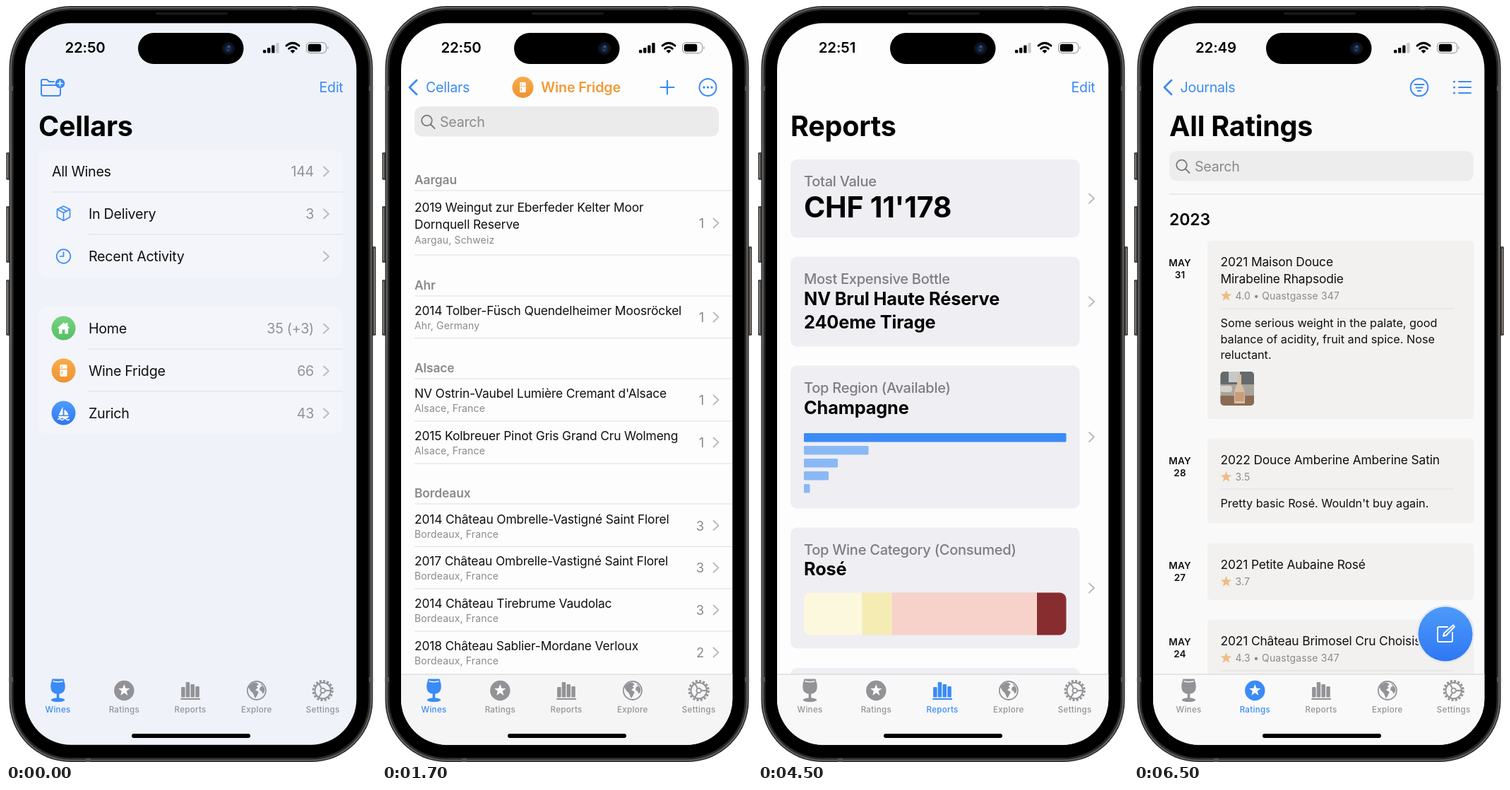
Animation of 524x1069 px, one loop 8000 ms. Source, as an HTML page:

```html
<!DOCTYPE html>
<html lang="en">
<head>
<meta charset="utf-8">
<title>Wine cellar app</title>
<style>
html, body { margin: 0; width: 100%; height: 100%; overflow: hidden; background: #fff; }
svg { display: block; width: 524px; height: 1069px; font-family: Inter, Roboto, sans-serif; }
</style>
</head>
<body>
<svg id="stage" viewBox="0 0 524 1069"></svg>
<script>
const BLUE = '#3b8bf6', ORANGE = '#f19a38', GRAY = '#8a8a8e', INK = '#101012';

// Drawing helpers; each returns SVG markup.
// Larger text is set tighter, bold text a little less so.
const tracking = (s, weight) => Math.max(weight >= 600 ? -.006 : -.015, .025 - .0058 * (s - 11.6)) * s;
const text = (x, y, str, size, fill = INK, weight = 400, anchor = 'start') =>
  `<text x="${x}" y="${y}" font-size="${size}" fill="${fill}" font-weight="${weight}" text-anchor="${anchor}" letter-spacing="${tracking(size, weight).toFixed(3)}">${str}</text>`;
const rect = (x, y, w, h, r, fill, extra = '') =>
  `<rect x="${x}" y="${y}" width="${w}" height="${h}" rx="${r}" fill="${fill}" ${extra}/>`;
const disc = (x, y, r, fill) => `<circle cx="${x}" cy="${y}" r="${r}" fill="${fill}"/>`;
const ring = (x, y, r, color, w = 2, extra = '') =>
  `<circle cx="${x}" cy="${y}" r="${r}" fill="none" stroke="${color}" stroke-width="${w}" ${extra}/>`;
const fillPath = (d, fill) => `<path d="${d}" fill="${fill}"/>`;
const stroke = (d, color, w = 2) =>
  `<path d="${d}" fill="none" stroke="${color}" stroke-width="${w}" stroke-linecap="round" stroke-linejoin="round"/>`;
const rule = (y, x = 46, end = 496, color = '#dedee0') => rect(x, y - .5, end - x, 1, 0, color);
const at = (x, y, body) => `<g transform="translate(${x} ${y})">${body}</g>`;
const many = (list, draw) => list.map(draw).join('');

const chevron = (x, y) => stroke(`M${x - 3.5} ${y - 6.5}l7 6.5l-7 6.5`, '#bbbbc0');
const back = x => stroke(`M${x + 11} 105l-10 10l10 10`, BLUE, 2.8);
const plus = (x, y, r, color, w = 2) => stroke(`M${x - r} ${y}h${2 * r}M${x} ${y - r}v${2 * r}`, color, w);
const starPath = (x, y, r) => 'M' + Array.from({ length: 10 }, (_, i) => {
  const a = i * Math.PI / 5, k = i % 2 ? r * .42 : r;
  return `${(x + k * Math.sin(a)).toFixed(2)} ${(y - k * Math.cos(a)).toFixed(2)}`;
}).join('L') + 'Z';
const heading = str => text(46, 184, str, 39.5, '#000', 700);
const edit = text(477.5, 122, 'Edit', 19.7, BLUE, 400, 'end');
const searchBox = (x, y, fill) => rect(x, y, 431, 42.5, 11, fill) +
  ring(x + 17.5, y + 20, 7.3, '#77777b', 1.8) + stroke(`M${x + 23} ${y + 25.5}l5.5 5.5`, '#77777b', 1.8) +
  text(x + 36, y + 29, 'Search', 19.7, GRAY);

const house = fillPath('M-9 0L0-8L3-5.5V-7.5H6V-3L9 0H6.5V8H2V2H-2V8H-6.5V0Z', '#fff');
const fridge = rect(-5, -8.5, 10, 17, 1.5, '#fff') + fillPath('M-5-2H5M-3-6h1.3v2.5H-3zM-3 1h1.3v4H-3zM-5-2.5H5v1H-5z', ORANGE);
const boat = fillPath('M-1-9V3H-7ZM1-5Q6-2 7 3H1ZM-8 4.5H8L5.5 7.5H-5.5Z', '#fff') + stroke('M-8 9q2-2 4 0t4 0t4 0t4 0', '#fff', 1.2);

// Status bar
function status(time, dx, weak) {
  const bars = many([4.5, 7.5, 11, 14.5], (h, i) =>
    rect(364 + i * 6.1, 66.5 - h, 4.3, h, 1.2, i == 3 && weak ? '#c9c9cb' : '#000'));
  const wifi = many([[9, 56.2], [5.4, 60.3]], ([r, y]) => stroke(`M${406 - r} ${y}Q406 ${y - r * .85} ${406 + r} ${y}`, '#000', 2.9)) +
    fillPath('M406 67l-3.4-3.6q3.4-2.8 6.8 0z', '#000');
  const battery = rect(425.6, 51.6, 28, 15, 5, 'none', 'stroke="#a2a2a6" stroke-width="1.2"') +
    rect(427.8, 53.8, 18.5, 10.6, 3, '#000') + fillPath('M455.4 56.5q2.6 2.6 0 5.2z', '#a2a2a6');
  return at(dx, 0, text(112, 66, time, 20.4, '#000', 600, 'middle') + bars + wifi + battery);
}

// Tab bar; icons are centred on the origin and coloured by c.
const tabs = [
  ['Wines', c => fillPath('M-8-16.5H8Q10.3-10 10.3-5.5Q10.3 4.6 0 5Q-10.3 4.6-10.3-5.5Q-10.3-10-8-16.5Z', c) + rect(-1.8, 4, 3.6, 9, 0, c) +
    `<ellipse cy="13.2" rx="9.8" ry="2.9" fill="${c}"/>` + stroke('M-6.5-13Q0-11.4 6.5-13', '#f4f5f8', 1.4)],
  ['Ratings', c => disc(0, 0, 14.2, c) + fillPath(starPath(0, -.3, 8.6), '#fff')],
  ['Reports', c => many([[-13, -5], [-6.4, -12], [.4, -9], [7.2, -6]], ([x, y]) => rect(x, y, 5.5, 9.5 - y, 1.3, c)) +
    rect(-14, 10.8, 28, 2.1, 1, c)],
  ['Explore', c => ring(0, 0, 13, c, 1.8) +
    fillPath('M-11.5-5Q-8-11-1-11.5L3-9L0-6L2-4L-2-1L3 2L0 8L-2 11L-5 4L-9 0ZM5-10Q11-7 11.5 0L9 5L7 1L4-1L5-5L8-6Z', c)],
  ['Settings', c => ring(0, 0, 11.3, c) + ring(0, 0, 13.7, c, 2.8, 'stroke-dasharray="3.1 2.28"') +
    ring(0, 0, 3.3, c, 1.8) + stroke('M3.5 0H10.5M-1.7-3L-5.2-9.2M-1.7 3L-5.2 9.2', c)]
];
function tabBar(active, dx, fill) {
  const bar = fill ? rect(26, 945, 472, 102, 0, fill) + rule(945, 26, 498, '#d2d2d4') : '';
  return bar + many(tabs, ([name, icon], i) => {
    const c = i == active ? BLUE : '#939397', x = 73.5 + i * 93.8 + dx;
    return at(x, 968, icon(c)) + text(x, 999, name, 11.6, c, 500, 'middle');
  }) + rect(178 + dx, 1029, 168, 6, 3, '#000');
}

function cellars() {
  const row = (y, name, x, count = '') => text(x, y + 7, name, 19.7) +
    text(436, y + 7, count, 19.7, '#929296', 400, 'end') + chevron(453.5, y);
  const places = [[456, 'Home', '35 (+3)', 'green', house], [516, 'Wine Fridge', '66', 'orange', fridge], [576, 'Zurich', '43', 'blue', boat]];
  return stroke('M50 124V106Q50 104 52 104H58L61 107H68M50 112H77M77 117V124Q77 127 74 127H53Q50 127 50 124', BLUE) +
    disc(76.5, 109.5, 6.8, BLUE) + plus(76.5, 109.5, 3.4, '#fff', 1.6) + edit + heading('Cellars') +
    rect(46, 204, 431, 180, 12, '#f3f5fa') + rect(46, 425, 431, 180, 12, '#f3f5fa') +
    row(234, 'All Wines', 65, '144') + row(294, 'In Delivery', 117, '3') + row(354, 'Recent Activity', 117) +
    many([[263, 65], [323, 117], [485, 117], [545, 117]], ([y, x]) => rule(y, x, 477)) +
    stroke('M81.5 283l9 4.5v11l-9 5l-9-5v-11zM72.5 287.5l9 5l9-5M81.5 292.5v11M77 285.3l9 5', BLUE, 1.6) +
    ring(81.5, 354, 9.8, BLUE, 1.7) + stroke('M81.5 348v6h-5', BLUE, 1.7) +
    many(places, ([y, name, count, color, icon]) => disc(81.5, y - .5, 17, `url(#${color})`) + at(81.5, y - .5, icon) + row(y, name, 117, count));
}

function wineList() {
  const wine = (y, name, place, count) => text(46, y, name, 17.4) + text(46, y + 20, place, 14, GRAY) +
    text(456, y + 10, count, 18.5, GRAY, 400, 'end') + chevron(473, y + 3);
  return back(38) + text(62, 122, 'Cellars', 19.7, BLUE) + disc(199.5, 115, 15, 'url(#orange)') + at(199.5, 115, `<g transform="scale(.85)">${fridge}</g>`) +
    text(225, 122, 'Wine Fridge', 19.7, ORANGE, 600) + plus(404, 115, 9.5, BLUE, 2.2) + ring(461.5, 115, 12, BLUE) +
    many([-5.5, 0, 5.5], d => disc(461.5 + d, 115, 1.7, BLUE)) + searchBox(46, 142, '#ebebec') +
    many([['Aargau', 252], ['Ahr', 401], ['Alsace', 518], ['Bordeaux', 695]], ([s, y]) => text(46, y, s, 17.4, GRAY, 600) + rule(y + 9)) +
    text(46, 291, '2019 Weingut zur Eberfeder Kelter Moor', 17.4) + text(46, 315, 'Dornquell Reserve', 17.4) +
    text(46, 336, 'Aargau, Schweiz', 14, GRAY) + text(456, 314, '1', 18.5, GRAY, 400, 'end') + chevron(473, 307) +
    wine(437, '2014 Tolber-Füsch Quendelheimer Moosröckel', 'Ahr, Germany', 1) +
    wine(554, "NV Ostrin-Vaubel Lumière Cremant d'Alsace", 'Alsace, France', 1) +
    wine(614, '2015 Kolbreuer Pinot Gris Grand Cru Wolmeng', 'Alsace, France', 1) +
    many([['2014 Château Ombrelle-Vastigné Saint Florel', 3], ['2017 Château Ombrelle-Vastigné Saint Florel', 3],
      ['2014 Château Tirebrume Vaudolac', 3], ['2018 Château Sablier-Mordane Verloux', 2]],
      ([name, n], i) => wine(731.5 + i * 59.8, name, 'Bordeaux, France', n)) +
    many([352, 469.5, 587, 647, 764.5, 824, 884], y => rule(y));
}

function detail() {
  const button = (x, label, iconX, labelX, glyph) => rect(x, 328, 171.5, 52, 9, '#edf1ea') + disc(iconX, 354, 10.2, BLUE) +
    stroke(glyph, '#fff', 2.2) + text(labelX, 360.5, label, 18.6, BLUE, 600);
  const chip = (x, y, w, name) => rect(x, y, w, 31.5, 15.7, '#ebf6ed') + text(x + 11.5, y + 21, name, 14) +
    ring(x + w - 20, y + 16, 6.8, BLUE, 1.3) + disc(x + w - 20, y + 12.8, 1, BLUE) + stroke(`M${x + w - 20.8} ${y + 15.5}h1v4`, BLUE, 1.2);
  const action = (y, name) => text(98, y, name, 19.4, BLUE);
  return back(38) + text(262, 184, '2017', 19.7, INK, 600, 'middle') +
    text(262, 219, 'Château Ombrelle-Vastigné', 25, '#000', 700, 'middle') + text(262, 252, 'Saint Florel', 25, '#000', 700, 'middle') +
    text(262, 278, 'Red Wine from Bordeaux, France', 14, GRAY, 400, 'middle') + text(262, 299.5, 'Wine Fridge', 14, ORANGE, 600, 'middle') +
    button(83, 'Add', 145.5, 167, 'M140.5 354h10M145.5 349v10') + button(269.5, 'Remove', 314, 336, 'M309 354h10') +
    many([['Inventory', 428], ['Past Transactions', 538], ['Grape Varieties', 649], ['More Actions', 805]],
      ([s, y]) => text(46, y, s, 17.4, '#858589', 500) + rule(y + 9.3)) +
    text(46, 471, '750 ml', 19.7) + text(478, 471, '3', 19.7, GRAY, 400, 'end') + rule(490) +
    rect(46, 559.5, 28.5, 28.5, 6, '#e8f6e9') + plus(60.2, 574, 6, '#5dbb63', 2.3) +
    text(86.5, 570, '3 ×', 15, GRAY) + text(114, 570, '750 ml', 15) +
    text(86.5, 590, 'Added • 1 month ago • CHF 77.00 per btl. • Cavuro', 14, GRAY) + rule(600) +
    chip(46, 671, 154, 'Cabernet Franc') + chip(210.5, 671, 187, 'Cabernet Sauvignon') +
    chip(46, 712.5, 93, 'Merlot') + chip(150, 712.5, 129.5, 'Petit Verdot') +
    stroke(starPath(62, 842, 11), BLUE, 1.7) + action(848, 'Add Rating') + rule(867) +
    stroke('M53 893V891Q53 889 55 889H70Q72 889 72 891V901Q72 904 69 904H60M54 885.5H71M56 882.5H69', BLUE, 1.7) +
    disc(53.5, 900, 5.2, BLUE) + plus(53.5, 900, 2.6, '#fff', 1.3) + action(900, 'Add Another Vintage') + rule(920) +
    stroke('M54 953L60 938L66 953M67 937H75M71 937V950', BLUE, 1.8) + action(952.5, 'Edit Wine');
}

function reports() {
  const card = (y, h, label) => rect(46, y, 409.5, h, 9, '#efeef3') + text(65, y + 38, label, 20.1, '#7d7d82', 500) + chevron(472.5, y + h / 2);
  const big = (y, str) => text(65, y, str, 25.3, '#000', 700);
  const strip = [[65, 82, '#fcf8dd'], [147.5, 41.5, '#f5ecb4'], [189.5, 205, '#f6d2ca'], [395, 42, '#882d2f']];
  return edit + heading('Reports') +
    card(217, 110.5, 'Total Value') + text(65, 299, "CHF 11'178", 41, '#000', 700) +
    card(354.5, 127, 'Most Expensive Bottle') + big(422.5, 'NV Brul Haute Réserve') + big(456, '240eme Tirage') +
    card(508.5, 202, 'Top Region (Available)') + big(577, 'Champagne') +
    many([371.5, 91.5, 48, 35, 8.5], (w, i) => rect(65, 604 + i * 18, w, 12.5, 1.5, i ? '#89b9f5' : BLUE)) +
    card(737.5, 171, 'Top Wine Category (Consumed)') + big(805, 'Rosé') +
    `<g clip-path="url(#strip)">${many(strip, ([x, w, c]) => rect(x, 829, w, 61, 0, c))}</g>` +
    rect(46, 936, 409.5, 60, 9, '#efeef3');
}

function ratings() {
  const entry = (y, h, day, lines, score) => {
    const end = y + 36 + (lines.length - 1) * 23.5;
    return rect(104, y, 377, h, 5, '#f2f1f0') + text(65, y + 36, 'MAY', 13.5, INK, 600, 'middle') + text(65, y + 53, day, 13.5, INK, 600, 'middle') +
      many(lines, (s, i) => text(122.5, y + 36 + i * 23.5, s, 17.4)) +
      fillPath(starPath(130.5, end + 18.5, 8.2), '#ecbd85') + text(143.5, end + 23.5, score, 14, GRAY);
  };
  const note = (y, str) => text(122.5, y, str, 16.3);
  const photo = `<g clip-path="url(#photo)">${rect(122, 517, 49, 49, 0, '#a9a39b') + rect(122, 517, 49, 18, 0, '#666a6c') +
    rect(134, 517, 16, 15, 0, '#c5c9c9') + rect(122, 551, 49, 15, 0, '#8b6a53') + rect(122, 537, 17, 9, 4, '#d5d0c8') +
    fillPath('M146 521H152V535Q158 541 157 562H142Q141 541 146 535Z', '#d8bfa5') + rect(143, 546, 13, 13, 1, '#c89e78')}</g>`;
  return back(42) + text(65.5, 122, 'Journals', 19.7, BLUE) + ring(404, 115, 12.3, BLUE) +
    stroke('M397.5 111h13M399.5 115.5h9M402 120h4', BLUE) +
    many([107, 115, 123], y => disc(453.5, y, 1.6, BLUE) + stroke(`M460 ${y}h17`, BLUE)) +
    at(4, 0, heading('All Ratings')) + searchBox(50, 205, '#ededed') + rule(266, 50) + text(50, 310, '2023', 23, '#000', 600) +
    entry(332, 252, 31, ['2021 Maison Douce', 'Mirabeline Rhapsodie'], '4.0 • Quastgasse 347') + rule(428, 123, 452) +
    note(454, 'Some serious weight in the palate, good') + note(476.5, 'balance of acidity, fruit and spice. Nose') + note(499, 'reluctant.') + photo +
    entry(611.5, 120, 28, ['2022 Douce Amberine Amberine Satin'], '3.5') + rule(683, 123, 452) +
    note(709, "Pretty basic Rosé. Wouldn't buy again.") +
    entry(759.5, 80.5, 27, ['2021 Petite Aubaine Rosé'], '3.7') +
    entry(867.5, 120, 24, ['2021 Château Brimosel Cru Choisis'], '4.3 • Quastgasse 347') + rule(940, 123, 452) +
    disc(441, 888, 41, '#e4e9f1') + disc(441, 888, 38.5, 'url(#blue)') +
    stroke('M444 878H432Q430 878 430 880V897Q430 899 432 899H449Q451 899 451 897V886M438 891L439 887L452 875.5L454 877.5L442 890Z', '#fff', 1.9);
}

// [start ms, background, body, time, active tab, x shift, tab bar fill, weak signal]
const screens = [
  [0, '#eff2f9', cellars, '22:50', 0, 0, '', true],
  [500, '#fdfdfd', wineList, '22:50', 0, 0, '#f5f5f6', false],
  [2500, '#fcfcfc', detail, '22:50', 0, 0, '#f8f9f8', true],
  [4500, '#fdfdfd', reports, '22:51', 2, 0, '#f8f8f9', true],
  [6500, '#f9f9f9', ratings, '22:49', 1, 4, '#f9f9f9', true]
];
const gradient = (id, from, to) =>
  `<linearGradient id="${id}" x2="0" y2="1"><stop stop-color="${from}"/><stop offset="1" stop-color="${to}"/></linearGradient>`;
const clip = (id, ...box) => `<clipPath id="${id}">${rect(...box, '#000')}</clipPath>`;

// Phone body: metal rings nested around the black bezel
const body = (inset, fill) => rect(4.5 + inset, inset, 515 - 2 * inset, 1069 - 2 * inset, 87 - inset, fill);
const phone = many([[207, 39], [283, 80], [387, 79]], ([y, h]) => rect(0, y, 7, h, 2, '#4a4947') + rect(1, y + 3, 1.5, h - 6, 0, '#85827e')) +
  rect(517, 340, 7, 126, 2, '#4a4947') + rect(521.5, 343, 1.5, 120, 0, '#85827e') +
  body(0, '#2b2a29') + body(1.5, '#6b6966') + body(3.2, '#2c2b2a') + body(6, '#000') +
  many([[4.5, 113], [4.5, 949], [514, 113], [514, 949]], ([x, y]) => rect(x, y, 5.5, 7, 0, '#555350')) +
  rect(405, 0, 7, 5, 0, '#555350') + rect(113, 1064, 7, 5, 0, '#555350') + rect(212, 9, 102, 3.5, 1.7, '#181818');

const island = rect(187, 38, 149.5, 44, 22, '#000') + disc(315, 60, 9, '#0e131d') + disc(315, 60, 5, '#17284a') + disc(315.5, 57.5, 2, '#31558d') + disc(314.5, 62.5, 1.5, '#284a80');

const stage = document.getElementById('stage');
stage.innerHTML = `<defs>${gradient('green', '#77d282', '#56bf63') + gradient('orange', '#f8ac4b', '#ef922f') + gradient('blue', '#4d9bfa', '#2f77f3') +
  clip('screen', 27, 24.3, 469.3, 1020.4, 65) + clip('strip', 65, 829.5, 371.5, 60, 9) + clip('photo', 122.5, 517, 47.5, 48, 5)}</defs>` + phone +
  `<g clip-path="url(#screen)">${many(screens, ([, bg, content, time, tab, dx, bar, weak]) =>
    `<g class="screen">${rect(26, 23, 472, 1023, 0, bg) + content() + tabBar(tab, dx, bar) + status(time, dx, weak)}</g>`)}</g>` + island;

const layers = [...stage.querySelectorAll('.screen')];
function draw() {
  const t = performance.now() % 8000;
  const current = screens.findLastIndex(s => t >= s[0]);
  layers.forEach((layer, i) => layer.setAttribute('display', i == current ? 'inline' : 'none'));
  requestAnimationFrame(draw);
}
draw();
</script>
</body>
</html>
```
